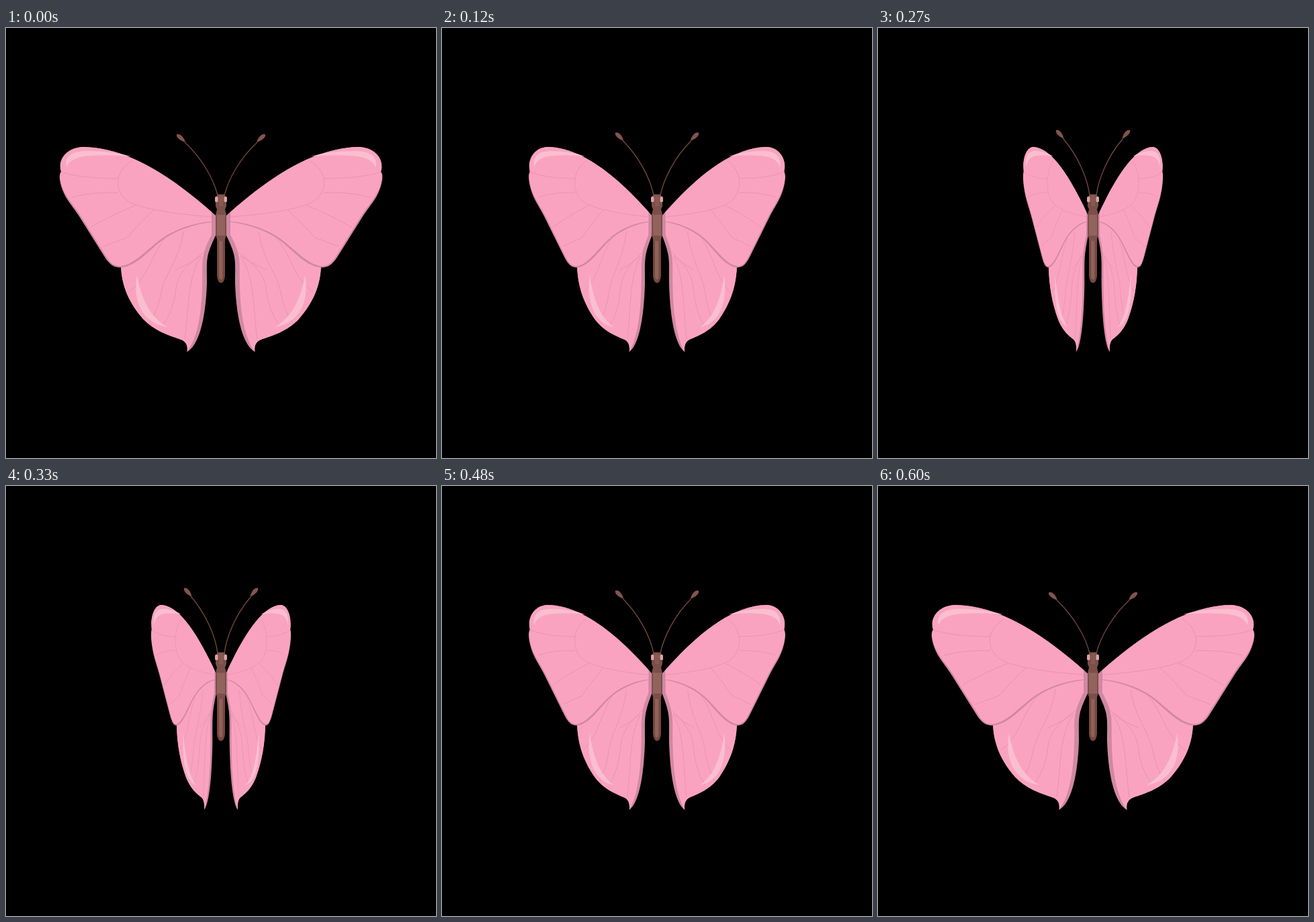
Animation of 640x640 px, one loop 660 ms. Source, as an HTML page:

```html
<!DOCTYPE html>
<html lang="en">
<head>
<meta charset="utf-8">
<title>Butterfly</title>
<style>
  html, body { margin: 0; height: 100%; overflow: hidden; background: #000; }
  svg { display: block; width: 100%; height: 100%; }
  .pink { fill: #faa3c0; }
  .shade { fill: #d088a2; }
  .shine { fill: #f9bfd1; }
  .veins { fill: none; stroke: #e893af; stroke-width: 1; }
</style>
</head>
<body>
<svg viewBox="0 0 640 640">
  <g id="half">
    <g id="wing">
      <!-- hind wing -->
      <path class="shade" d="M171 350C171 385 185 411 204 433C222 452 244 458 261 464C268 467 271 473 269.5 482C286 473 297 437 299 380C299 360 298 348 301 336C304 325 309 315 313 307V285L240 300Z"/>
      <path class="pink" d="M171 350C171 385 185 411 204 433C222 452 244 458 261 464C268 467 271 473 269.5 482C283 465 291 430 292 385C293 365 291 350 294 338C296 327 302 315 306 308V288L240 300Z"/>
      <path class="veins" d="M238 312C214 340 212 372 183 393M264 303C258 345 236 366 231 394Q226 421 213 440M294 334C268 354 256 366 253 388Q250 421 232 444M291 340C270 370 273 410 266 463M290 339Q274 351 252 360"/>
      <path class="shine" d="M195 368C188 408 204 440 240 445C217 432 202 408 195 368Z"/>
      <!-- fore wing -->
      <path class="shade" d="M313 280C262 234 190 178 115 177C92 178 79 193 81 209L82 214C79 218 79 224 82 235C88 255 98 263 110 282L147 341C154 352 161 357 172 356.5C195 354 212 331 235 314C255 300 285 291 306 289V314L313 307Z"/>
      <path class="pink" d="M306 274C257 231 188 178 115 177C92 178 79 193 81 209L82 214C79.500 218 80 224 83 235C90 254 100 262 112 281L149 340C156 351 162 355 171 354.500C193 351 211 328 234 312C254 298 285 289 306 288Z"/>
      <path class="veins" d="M188 198C158 214 160 250 190 262Q225 275 306 281M82 214Q110 224 167 224M98 252Q125 244 167 245M125 297Q155 279 193 264M145 325L180 312Q198 291 221 270"/>
      <path class="shine" d="M90 207C86 187 105 183 123 183Q155 183 186 191Q155 188 129 190C105 191 94 197 90 207Z"/>
    </g>
    <g id="antenna">
      <path d="M315 249C309 225 292 194 266 170" fill="none" stroke="#70483f" stroke-width="1.400"/>
      <path d="M254 158.500C259 156 265 163 267 170C260 168 253 163 254 158.500Z" fill="#83544e"/>
    </g>
  </g>
  <use href="#half" transform="matrix(-1 0 0 1 640 0)"/>
  <!-- body -->
  <path d="M314 308H326V369Q325 379 320 379.500Q315 379 314 369Z" fill="#74483f"/>
  <path d="M317 316H322.500V372Q320 377 317 372Z" fill="#90605b"/>
  <path d="M315 247.500H325L328 252V265L326 270L328 278V308L325 317H315L312 308V278L314 270L312 265V252Z" fill="#7b4f4a"/>
  <path d="M314 278H326V309H314Z" fill="#92625d"/>
  <path d="M317 249H323V265H317Z" fill="#88594f"/>
  <rect x="311" y="251" width="4.500" height="8" rx="1.500" fill="#dba3aa"/>
  <rect x="324.500" y="251" width="4.500" height="8" rx="1.500" fill="#dba3aa"/>
</svg>
<script>
  const LOOP = 660, STEP = 30, LAST = 20;
  const wing = document.getElementById('wing');
  const antenna = document.getElementById('antenna');
  const hingeX = 313.3;
  const smooth = u => u * u * (3 - 2 * u);

  function draw(now) {
    const step = Math.min(LAST, Math.floor(now % LOOP / STEP));
    const fold = smooth(1 - Math.abs(step / (LAST / 2) - 1));
    const scale = 1 - 0.6 * fold;
    wing.setAttribute('transform', `matrix(${scale} 0 0 1 ${hingeX * (1 - scale)} 0)`);
    antenna.setAttribute('transform', `rotate(${6.9 * fold} 315 249)`);
  }

  const start = performance.now();
  function tick() {
    draw(performance.now() - start);
    requestAnimationFrame(tick);
  }
  tick();
</script>
</body>
</html>
```
